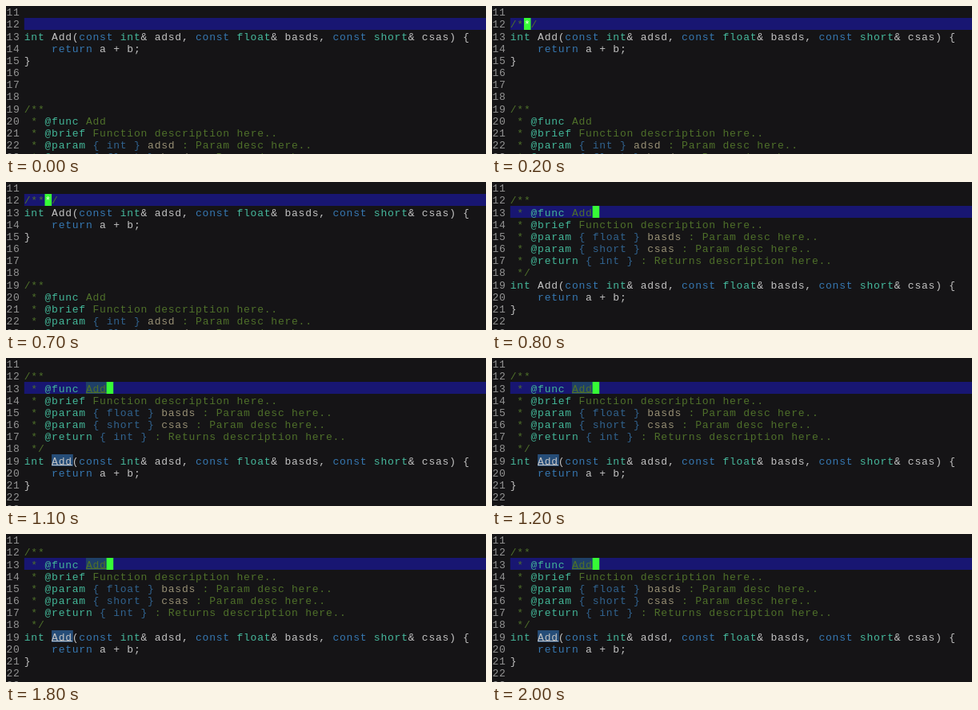
An HTML page with a canvas that plays this animation: 600x186 px, repeating every 2.1 s.

```html
<!DOCTYPE html>
<html lang="en">
<head>
<meta charset="utf-8">
<title>Doc comment in an editor</title>
<style>
html, body { margin: 0; width: 100%; height: 100%; overflow: hidden; background: #151416; }
canvas { display: block; }
</style>
</head>
<body>
<canvas id="stage" width="600" height="186"></canvas>
<script>
const ctx = document.getElementById('stage').getContext('2d');
const LOOP = 2100;
const FIRST = 11, ROW_H = 15.18, COL_W = 8.57, LEFT = 22.8, TOP = -0.4;
const FONT_SIZE = 13;
const COLOR = {
  back: '#151416', bar: '#181672', number: '#939393', plain: '#c2c2c2',
  comment: '#4f702a', tag: '#43b698', type: '#46b99d', keyword: '#3678b2',
  field: '#31638f', param: '#978f74', cursor: '#36fb36',
  match: '#264d78', matchOnBar: '#1f4068'
};

const signature = 'int Add(const int& adsd, const float& basds, const short& csas) {';
const body = [signature, '    return a + b;', '}'];
const doc = params => [
  '/**', ' * @func Add', ' * @brief Function description here..',
  ...params.map(([type, name]) => ` * @param { ${type} } ${name} : Param desc here..`),
  ' * @return { int } : Returns description here..', ' */'
];
const args = [['int', 'adsd'], ['float', 'basds'], ['short', 'csas']];
const before = typed => ['', typed, ...body, '', '', '', ...doc(args)];
const after = ['', ...doc(args.slice(1)), ...body, '', ''];

const rowTop = row => TOP + (row - FIRST) * ROW_H;
const rowY = row => Math.round(rowTop(row));
const colX = col => LEFT + col * COL_W;

function fillRow(row, x, width, color) {
  ctx.fillStyle = color;
  ctx.fillRect(x, rowY(row), width, rowY(row + 1) - rowY(row));
}

function write(text, row, x, color) {
  ctx.fillStyle = color;
  ctx.fillText(text, x, rowTop(row) + 12.6);
}

// Splits a line into [text, color] pieces.
function highlight(line) {
  if (/^( \*|\/)/.test(line)) {
    const parts = line.split(/(@\w+|\{ \w+ \}|\w+(?= : ))/);
    return parts.map((part, i) => {
      if (i % 2 === 0) return [part, COLOR.comment];
      const color = part[0] === '@' ? COLOR.tag : part[0] === '{' ? COLOR.field : COLOR.param;
      return [part, color];
    });
  }
  return line.split(/\b(const|return|int|float|short)\b/).map(part => {
    if (/^(const|return)$/.test(part)) return [part, COLOR.keyword];
    if (/^(int|float|short)$/.test(part)) return [part, COLOR.type];
    return [part, COLOR.plain];
  });
}

function writeLine(line, row) {
  let col = 0;
  for (const [text, color] of highlight(line)) {
    write(text, row, colX(col), color);
    col += text.length;
  }
}

function markWord(row, col, back, line) {
  fillRow(row, colX(col), 3 * COL_W + 1, back);
  ctx.fillStyle = line;
  ctx.fillRect(colX(col), rowY(row + 1) - 2, 3 * COL_W, 1);
}

function stateAt(t) {
  if (t < 800) {
    const [typed, col] = t < 100 ? ['', -1] : t < 200 ? ['/', 1] : t < 300 ? ['/**/', 2] : ['/***/', 3];
    return { lines: before(typed), row: 12, col, marked: false };
  }
  const hidden = t >= 1400 && t < 1800;
  return { lines: after, row: 13, col: hidden ? -1 : 12, marked: t >= 1100 };
}

function draw(t) {
  const { lines, row, col, marked } = stateAt(t);
  ctx.fillStyle = COLOR.back;
  ctx.fillRect(0, 0, 600, 186);
  fillRow(row, LEFT, 600 - LEFT, COLOR.bar);
  ctx.font = `${FONT_SIZE}px "Liberation Mono", monospace`;
  // Keep glyphs on the editor's column grid.
  ctx.letterSpacing = `${COL_W - FONT_SIZE * 0.6}px`;
  if (marked) {
    markWord(13, 9, COLOR.matchOnBar, COLOR.comment);
    markWord(19, 4, COLOR.match, COLOR.plain);
  }
  for (let i = 0; i < 13; i++) {
    write(String(FIRST + i), FIRST + i, 0.4, COLOR.number);
    writeLine(lines[i] || '', FIRST + i);
  }
  if (col >= 0) {
    fillRow(row, colX(col), COL_W, COLOR.cursor);
    write(lines[row - FIRST][col] || '', row, colX(col), '#e9ffdc');
  }
}

function frame() {
  draw(performance.now() % LOOP);
  requestAnimationFrame(frame);
}
frame();
</script>
</body>
</html>
```
